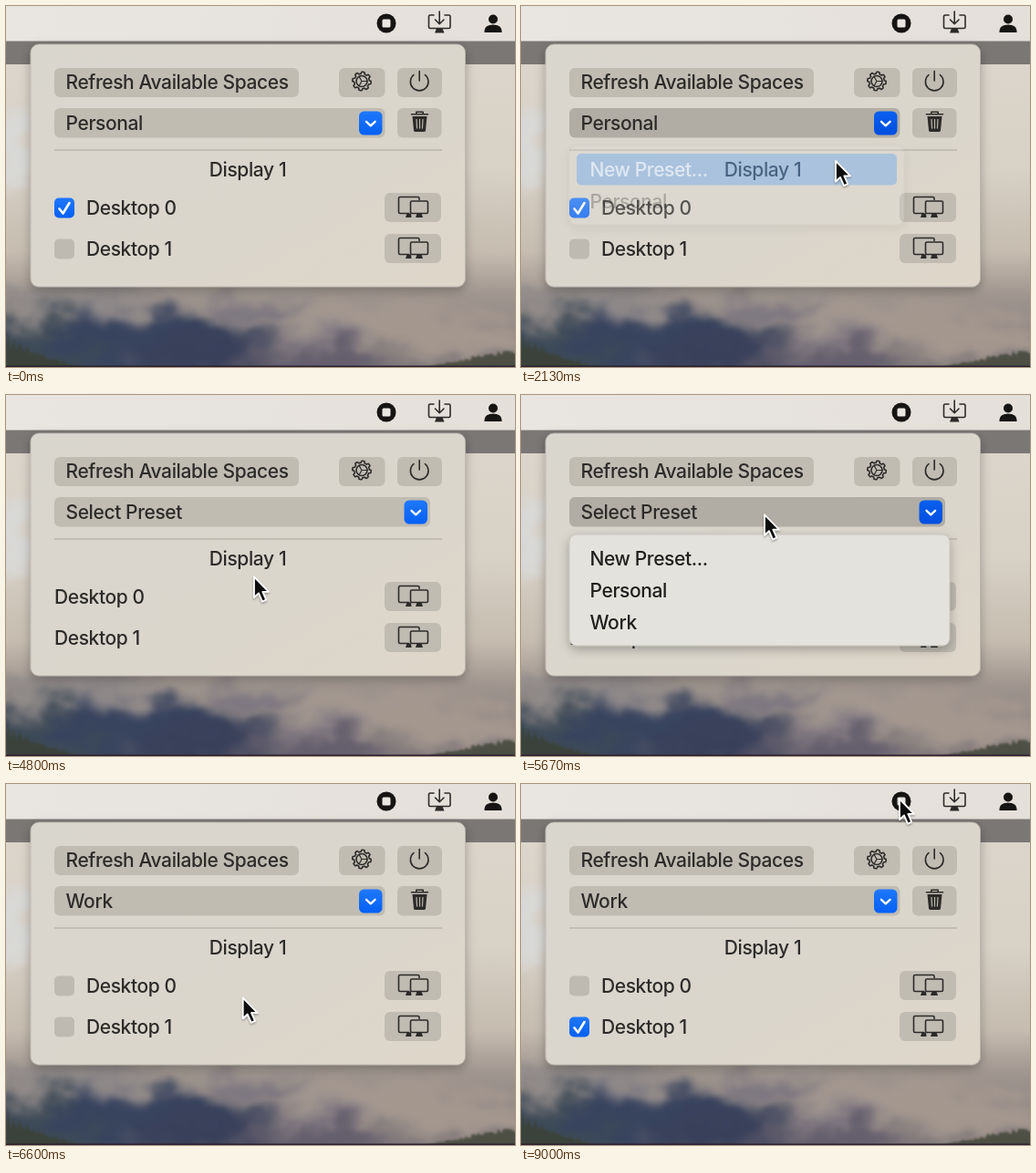
Animation of 558 by 396 pixels, one loop 9.07 s. Source, as an HTML page:

```html
<!DOCTYPE html>
<html lang="en">
<head>
<meta charset="utf-8">
<title>Desktop presets</title>
<style>
html, body { margin: 0; width: 100%; height: 100%; overflow: hidden; background: #d9d0c4; }
svg { display: block; }
text { font: 450 21px Inter, "Liberation Sans", sans-serif; letter-spacing: -.4px; fill: #2c2b29; white-space: pre; }
.btn { fill: #c0bcb2; }
.ink { fill: none; stroke: #2c2b29; stroke-width: 1.6; stroke-linecap: round; stroke-linejoin: round; }
.solid { fill: #2c2b29; }
.tick { fill: none; stroke: #fff; stroke-width: 2.6; stroke-linecap: round; stroke-linejoin: round; }
</style>
</head>
<body>
<svg id="stage" width="558" height="396" viewBox="0 0 558 396" xmlns="http://www.w3.org/2000/svg">
<defs>
  <linearGradient id="sky" x2="0" y2="1">
    <stop offset="0" stop-color="#ddd7cd"/><stop offset=".45" stop-color="#d8d1c6"/>
    <stop offset=".68" stop-color="#c6bcb0"/><stop offset=".8" stop-color="#a0968f"/>
    <stop offset="1" stop-color="#80787a"/>
  </linearGradient>
  <linearGradient id="bar"><stop offset="0" stop-color="#e9e6e2"/><stop offset="1" stop-color="#e4dfd9"/></linearGradient>
  <linearGradient id="glass" x2="1" y2="1">
    <stop offset="0" stop-color="#d9d6ce"/><stop offset=".6" stop-color="#dad6cc"/><stop offset="1" stop-color="#dfd6c9"/>
  </linearGradient>
  <linearGradient id="blue" x2="0" y2="1"><stop offset="0" stop-color="#1f78fb"/><stop offset="1" stop-color="#0560f6"/></linearGradient>
  <linearGradient id="deep" x2="0" y2="1"><stop offset="0" stop-color="#0a5fee"/><stop offset="1" stop-color="#004fe0"/></linearGradient>
  <filter id="mist" filterUnits="userSpaceOnUse" x="-60" y="40" width="680" height="420" color-interpolation-filters="sRGB">
    <feGaussianBlur stdDeviation="8" result="base"/>
    <feTurbulence type="fractalNoise" baseFrequency=".018 .026" numOctaves="4" seed="5" result="noise"/>
    <feDisplacementMap in="base" in2="noise" scale="60" xChannelSelector="R" yChannelSelector="G"/>
    <feGaussianBlur stdDeviation="2"/>
  </filter>
  <filter id="blurry"><feGaussianBlur stdDeviation=".8"/></filter>
  <filter id="shade" x="-20%" y="-20%" width="140%" height="150%"><feDropShadow dx="0" dy="4" stdDeviation="6" flood-opacity=".27"/></filter>
  <filter id="tiny" x="-50%" y="-50%" width="200%" height="200%"><feDropShadow dx="0" dy="1.5" stdDeviation="1.2" flood-opacity=".35"/></filter>
  <g id="screens">
    <path class="ink" d="M11 18H1.500Q0 18 0 16.500V1.500Q0 0 1.500 0H21Q22.500 0 22.500 1.500V3"/>
    <rect class="ink" x="13" y="4.500" width="19" height="13.500" rx="1.500"/>
    <path class="solid" d="M9 18H13.500L14 22.500H7.500ZM20 18H25L26.500 22.500H18.500Z"/>
  </g>
</defs>
<rect width="558" height="396" fill="url(#sky)"/>
<g id="clouds" filter="url(#mist)"></g>
<path id="trees" fill="#3a4032" opacity=".75" filter="url(#blurry)"/>
<rect y="394.500" width="558" height="1.500" fill="#2b2030"/>
<rect y="38" width="558" height="26" fill="#7a7775"/>
<rect width="558" height="38.500" fill="url(#bar)"/>
<g>
  <circle cx="417" cy="19" r="10.500" fill="#161514"/>
  <rect x="412.500" y="14.500" width="9" height="9" rx="1.500" fill="#eae6e1"/>
  <path class="ink" stroke-width="1.800" d="M469 10H465Q463.500 10 463.500 11.500V23Q463.500 24.500 465 24.500H485.500Q487 24.500 487 23V11.500Q487 10 485.500 10H481M475.200 6V19M470.500 15L475.200 19.700L480 15"/>
  <path class="solid" d="M472 24.500H478.500L480.500 29.500H470Z"/>
  <circle cx="534" cy="14.500" r="5" fill="#161514"/>
  <path d="M524.500 29V27Q525 20.500 534 20.500Q543 20.500 543.500 27V29Z" fill="#161514"/>
</g>
<rect id="panel" x="27" y="42" width="476.500" rx="9" fill="url(#glass)" stroke="#b9b4ac" stroke-width=".8" filter="url(#shade)"/>
<rect class="btn" x="53" y="68" width="268" height="32" rx="6"/>
<text x="65.500" y="90.500">Refresh Available Spaces</text>
<rect class="btn" x="365" y="68" width="50.500" height="32" rx="6"/>
<rect class="btn" x="429" y="68" width="49" height="32" rx="6"/>
<g class="ink">
  <path id="gear"/>
  <circle cx="390" cy="82.500" r="6"/>
  <path d="M390 82.500H396M390 82.500L387 77.300M390 82.500L387 87.700" stroke-width="1.200"/>
</g>
<path class="ink" d="M447 75.500A9.800 9.800 0 1 0 459.400 75.500M453.200 71.500V82"/>
<rect id="select" x="53" y="112" height="32.500" rx="6"/>
<text id="choice" x="65.500" y="135.500"></text>
<g id="arrow">
  <rect id="arrowBox" x="0" y="115.500" width="25.500" height="26" rx="5.500"/>
  <path class="tick" d="M8 126.800L12.800 131.300L17.600 126.800" style="stroke-width:2.300"/>
</g>
<g id="trash">
  <rect class="btn" x="429" y="112" width="48.500" height="32.500" rx="6"/>
  <path class="solid" d="M445.500 121H461.500L460 136.500Q459.800 138 458 138H449Q447.200 138 447 136.500Z"/>
  <path class="ink" d="M444.500 118.800H462.500M449.800 118V116.300H457.200V118" stroke-width="2"/>
  <path d="M450 124L450.600 134.500M453.500 124V134.500M457 124L456.400 134.500" stroke="#b9b5ac" stroke-width="1.200"/>
</g>
<g id="field">
  <rect x="52" y="156.500" width="427" height="35" rx="3" fill="#d5d1c9" stroke="#6593e1" stroke-width="5"/>
  <rect x="55" y="159.500" width="421" height="29" fill="none" stroke="#4d74b4" stroke-width="1"/>
  <text id="typed" x="60" y="181.500"></text>
  <rect id="caret" y="161.500" width="2.500" height="25" fill="#1668ee"/>
</g>
<g id="list">
  <path d="M53 158H478" stroke="#bab6ad" stroke-width="1.500"/>
  <text x="265" y="187.300" text-anchor="middle">Display 1</text>
  <g id="rows"></g>
</g>
<g id="menu">
  <rect id="sheet" x="53" y="153" rx="8" fill="#e4e2dc" stroke="#c1beb8" stroke-width=".8" filter="url(#shade)"/>
  <rect id="glow" x="61" height="34.500" rx="5" fill="#2b89fa"/>
  <text x="75.500" y="187.300">New Preset...</text>
  <text x="75.500" y="222.300">Personal</text>
  <text x="75.500" y="257.300">Work</text>
</g>
<path id="pointer" d="M0 0V22.500L5 17.800L9 27L13.200 25.200L9.300 16.300H16Z" fill="#0b0b0b" stroke="#fff" stroke-width="1.800" stroke-linejoin="round" filter="url(#tiny)"/>
<g id="beam" fill="none" stroke-linecap="round">
  <path id="beamEdge" d="M-4.500 -12.500Q0 -12.500 0 -9V9Q0 12.500 -4.500 12.500M4.500 -12.500Q0 -12.500 0 -9V9Q0 12.500 4.500 12.500M-3 4H3" stroke="#fff" stroke-width="4.500"/>
  <path id="beamCore" stroke="#111" stroke-width="2"/>
</g>
</svg>
<script>
const LOOP = 9070, STEP = 1000 / 15;
const $ = id => document.getElementById(id);
const set = (el, attrs) => { for (const k in attrs) el.setAttribute(k, attrs[k]); };
const show = (el, on) => { el.style.display = on ? '' : 'none'; };
const clamp = x => Math.max(0, Math.min(1, x));
const ease = x => x * x * (3 - 2 * x);
let seed = 7;
const rand = () => (seed = seed * 16807 % 2147483647) / 2147483647;

// Misty landscape: x, y, rx, ry, colour
const clouds = [
  [5, 160, 22, 45, '#d8d8d6'], [130, 385, 175, 48, '#4a5164'], [40, 375, 95, 38, '#3d4a57'],
  [150, 368, 100, 26, '#38435e'], [225, 385, 75, 20, '#39405a'], [330, 388, 75, 18, '#625d6c'],
  [70, 318, 110, 12, '#8f8a8a'], [110, 342, 45, 7, '#70717c'], [290, 332, 60, 12, '#79747f'],
  [400, 338, 100, 20, '#a3978f'], [480, 362, 100, 22, '#a4978e'], [350, 366, 60, 9, '#8d8488']
];
$('clouds').innerHTML = clouds.map(([x, y, rx, ry, c]) =>
  `<ellipse cx="${x}" cy="${y}" rx="${rx}" ry="${ry}" fill="${c}"/>`).join('');

function ridge(from, to, height) {
  let d = `M${from} 396`;
  for (let x = from; x < to; x += 4 + 5 * rand()) {
    const h = height((x - from) / (to - from));
    d += `L${x} ${396 - h * (.6 + .3 * rand())}L${x + 2.5} ${396 - h * (.8 + .4 * rand())}`;
  }
  return d + `L${to} 396Z`;
}
$('trees').setAttribute('d', ridge(0, 88, u => 30 * (1 - u) ** 1.4) + ridge(455, 562, u => 23 * u ** 1.1));
$('beamCore').setAttribute('d', $('beamEdge').getAttribute('d'));

let gear = '';
for (let i = 0; i < 64; i++) {
  const a = i / 64 * 2 * Math.PI, r = i % 8 < 4 ? 10.2 : 8.3;
  gear += (i ? 'L' : 'M') + (390 + r * Math.cos(a)).toFixed(1) + ' ' + (82.5 + r * Math.sin(a)).toFixed(1);
}
$('gear').setAttribute('d', gear + 'Z');

$('rows').innerHTML = [0, 1].map(i => `<g transform="translate(0 ${i * 45})">
  <g id="box${i}"><rect x="53" y="210.500" width="22" height="22" rx="5"/><path class="tick" d="M58.500 222.500L62.500 227.500L69.500 216"/></g>
  <text id="label${i}" y="229.300">Desktop ${i}</text>
  <rect class="btn" x="415" y="205" width="62" height="32" rx="6"/>
  <use href="#screens" x="430.500" y="209.500"/></g>`).join('');

// Pointer path: time, x, y
const path = [
  [200, 562, 8], [600, 470, 60], [1130, 345, 125], [1470, 345, 125], [1870, 345, 170],
  [2330, 345, 170], [2930, 281, 174], [4530, 281, 174], [4800, 272, 199.5], [5000, 270, 200],
  [5420, 267, 125], [5600, 267, 125], [6060, 267, 233.5], [6530, 267, 233.5],
  [7130, 77, 265.5], [7830, 77, 265.5], [8270, 410, 22], [8500, 410, 22], [8730, 415, 16.5], [LOOP, 415, 16.5]
];
function pointerAt(t) {
  let i = 0;
  while (i < path.length - 2 && t > path[i + 1][0]) i++;
  const [t0, x0, y0] = path[i], [t1, x1, y1] = path[i + 1];
  const u = ease(clamp((t - t0) / (t1 - t0)));
  return [x0 + (x1 - x0) * u, y0 + (y1 - y0) * u];
}

const menus = [
  { open: 1460, fade: 2050, end: 2270, width: 367, rows: 2 },
  { open: 5590, fade: 6310, end: 6470, width: 417, rows: 3 }
];
const keys = [3460, 3520, 3660, 3780];

function drawMenu(t, y) {
  const m = menus.find(m => t >= m.open && t < m.end);
  show($('menu'), m);
  if (!m) return;
  const row = Math.floor((y - 162) / 35);
  const alpha = 1 - clamp((t - m.fade) / (m.end - m.fade) * 1.6);
  $('sheet').style.opacity = alpha ** 1.6;
  show($('glow'), row >= 0);
  set($('sheet'), { width: m.width, height: 17 + 35 * m.rows });
  set($('glow'), { y: 162 + 35 * Math.max(0, row), width: m.width - 16, opacity: alpha ** 1.35 });
  $('menu').querySelectorAll('text').forEach((label, i) => {
    show(label, i < m.rows);
    label.style.fill = i === row ? '#fff' : '#1f1e1d';
    label.style.opacity = i === row ? alpha ** .5 : alpha ** 1.4;
  });
}

function drawBox(i, on, pressed) {
  const [box, tick] = $('box' + i).children;
  box.setAttribute('fill', on ? 'url(#blue)' : pressed ? '#a5a198' : '#bfbab1');
  show(tick, on);
}

function draw(time) {
  const t = Math.floor((time + 5) / STEP) * STEP + .5;
  const preset = t < 2320 ? 'Personal' : t < 6460 ? 'Select Preset' : 'Work';
  const none = preset === 'Select Preset';
  const editing = t > 2320 && t < 4390;
  const pressed = (t > 1390 && t < 2270) || (t > 5520 && t < 6460);
  const [x, y] = pointerAt(t);

  set($('panel'), { height: editing ? 312 : 266 });
  set($('select'), { width: none ? 412 : 362.5, fill: pressed ? '#b1ada4' : '#c0bcb2' });
  $('choice').textContent = preset;
  set($('arrow'), { transform: `translate(${none ? 436.5 : 387} 0)` });
  set($('arrowBox'), { fill: pressed ? 'url(#deep)' : 'url(#blue)' });
  show($('trash'), !none);
  set($('list'), { transform: `translate(0 ${editing ? 46 : 0})` });

  show($('field'), editing);
  const word = 'Work'.slice(0, keys.filter(k => t >= k).length);
  $('typed').textContent = word || 'New Preset Name';
  $('typed').style.fill = word ? '#2c2b29' : '#97938c';
  show($('caret'), t > 3250);
  if (editing) set($('caret'), { x: word ? 60 + $('typed').getComputedTextLength() : 58.5 });

  for (const i of [0, 1]) {
    show($('box' + i), !none);
    set($('label' + i), { x: none ? 53 : 88 });
  }
  drawBox(0, preset === 'Personal');
  drawBox(1, t > 7460, t > 7390);
  drawMenu(t, y);

  const beam = editing && t > 2860;
  show($('pointer'), t > 260 && !beam && !(t > 3460 && t < 4590));
  show($('beam'), beam && t < 3460);
  set($('pointer'), { transform: `translate(${x} ${y})` });
  set($('beam'), { transform: `translate(${x} ${y})` });
}

const start = performance.now();
function tick() {
  draw((performance.now() - start) % LOOP);
  requestAnimationFrame(tick);
}
tick();
</script>
</body>
</html>
```
